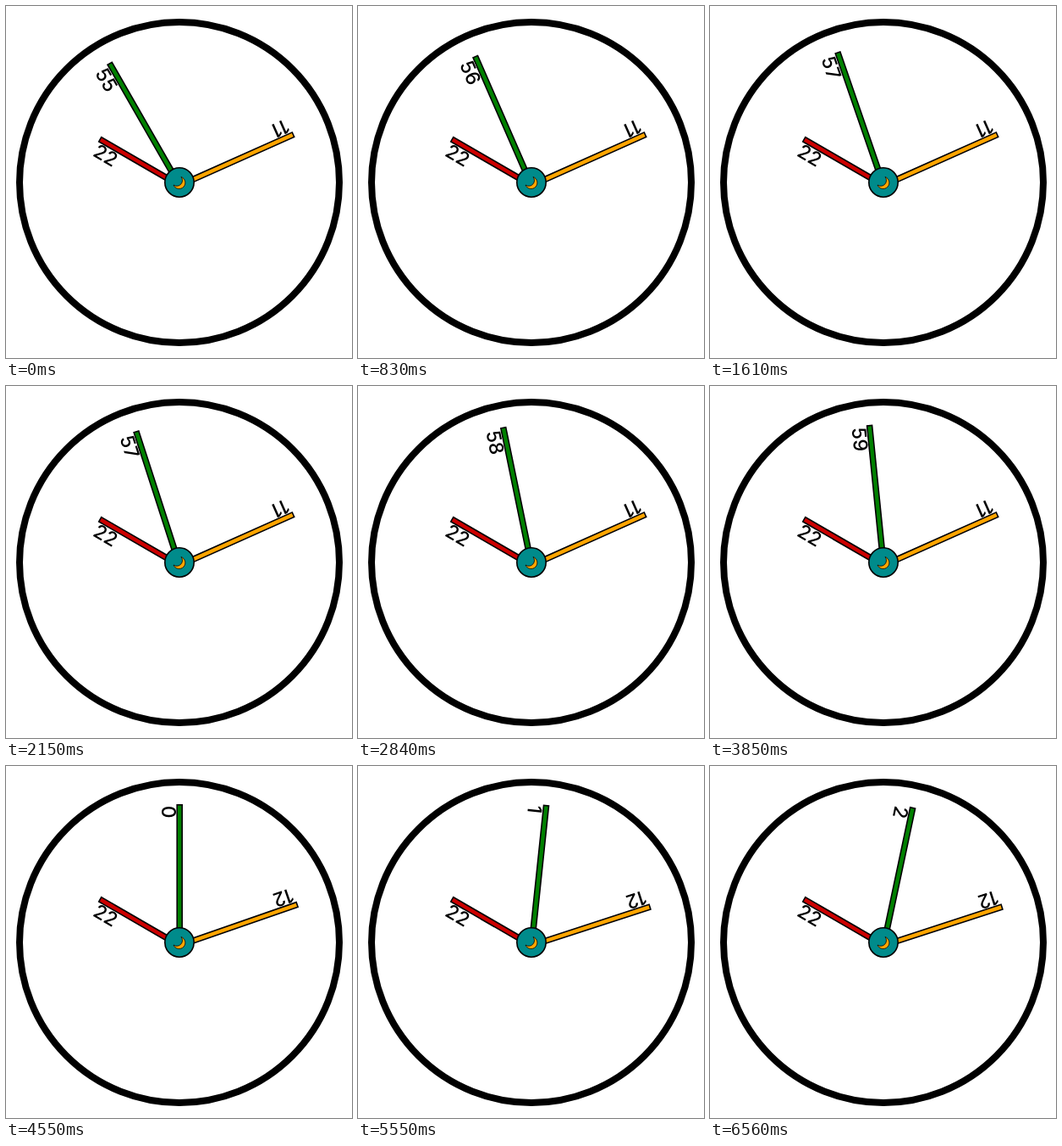
An HTML page that plays this animation: 409x415 px, repeating every 6.94 s.

```html
<!DOCTYPE html>
<html lang="en">
<head>
<meta charset="utf-8">
<title>Clock</title>
<style>
  html, body { margin: 0; width: 100%; height: 100%; overflow: hidden; background: #fff; }
  svg { display: block; width: 100%; height: 100%; }
  rect, .hub { stroke: #000; stroke-width: 1.6; }
  text { font: 500 23px Inter, "Open Sans", sans-serif; fill: #000; }
</style>
</head>
<body>
<svg viewBox="0 0 409 415">
  <circle cx="205" cy="208" r="189" fill="none" stroke="#000" stroke-width="8"/>
  <g id="hands"></g>
  <circle class="hub" cx="205" cy="208" r="17.2" fill="#008b8b"/>
  <path d="M207 201.5A7.2 7.2 0 1 1 198 211A6.6 6.6 0 0 0 207 201.5Z"
        fill="#ffa500" stroke="#000" stroke-width=".8"/>
</svg>
<script>
const LOOP = 6940;
const PIVOT = { x: 205.2, y: 211.5 };
const STEP = 77;
// Share of a tick covered at each step of the springy move
const SPRING = [0.82, 1.05, 1.06, 1.05, 1.04, 1.03, 1.02, 1];
// [time, second shown]; the spring is switched off once the hand reaches zero
const TICKS = [[-470, 55], [610, 56], [1610, 57], [2620, 58], [3540, 59],
               [4550, 60], [5550, 61], [6560, 62]];
const MINUTE_TICK = 4550;

const hands = document.getElementById('hands');

function add(parent, tag, attrs) {
  const node = document.createElementNS('http://www.w3.org/2000/svg', tag);
  for (const key in attrs) node.setAttribute(key, attrs[key]);
  return parent.appendChild(node);
}

function makeHand(length, fill) {
  const group = add(hands, 'g', {});
  add(group, 'rect', { x: -3, y: -length, width: 6, height: length, fill });
  const label = add(group, 'text', { transform: `translate(-21.2 ${1 - length}) rotate(90)` });
  return (angle, value) => {
    group.setAttribute('transform', `translate(${PIVOT.x} ${PIVOT.y}) rotate(${angle})`);
    if (label.textContent !== String(value)) label.textContent = value;
  };
}

const setHour = makeHand(108.5, '#c00');
const setMinute = makeHand(147, '#ffa500');
const setSecond = makeHand(165.7, '#008000');

function spring(elapsed) {
  const step = Math.floor(elapsed / STEP);
  return SPRING[Math.min(step, SPRING.length - 1)];
}

function draw(t) {
  const [start, second] = TICKS.filter(([time]) => time <= t).pop();
  const lag = second < 60 ? 1 - spring(t - start) : 0;
  setSecond((second - lag) * 6, second % 60);

  const pastMinute = t >= MINUTE_TICK;
  const minute = pastMinute ? 11 + spring(t - MINUTE_TICK) : 11;
  setMinute(minute * 6, pastMinute ? 12 : 11);

  setHour(300, 22);
}

const begin = performance.now();
function frame() {
  draw((performance.now() - begin) % LOOP);
  requestAnimationFrame(frame);
}
frame();
</script>
</body>
</html>
```
